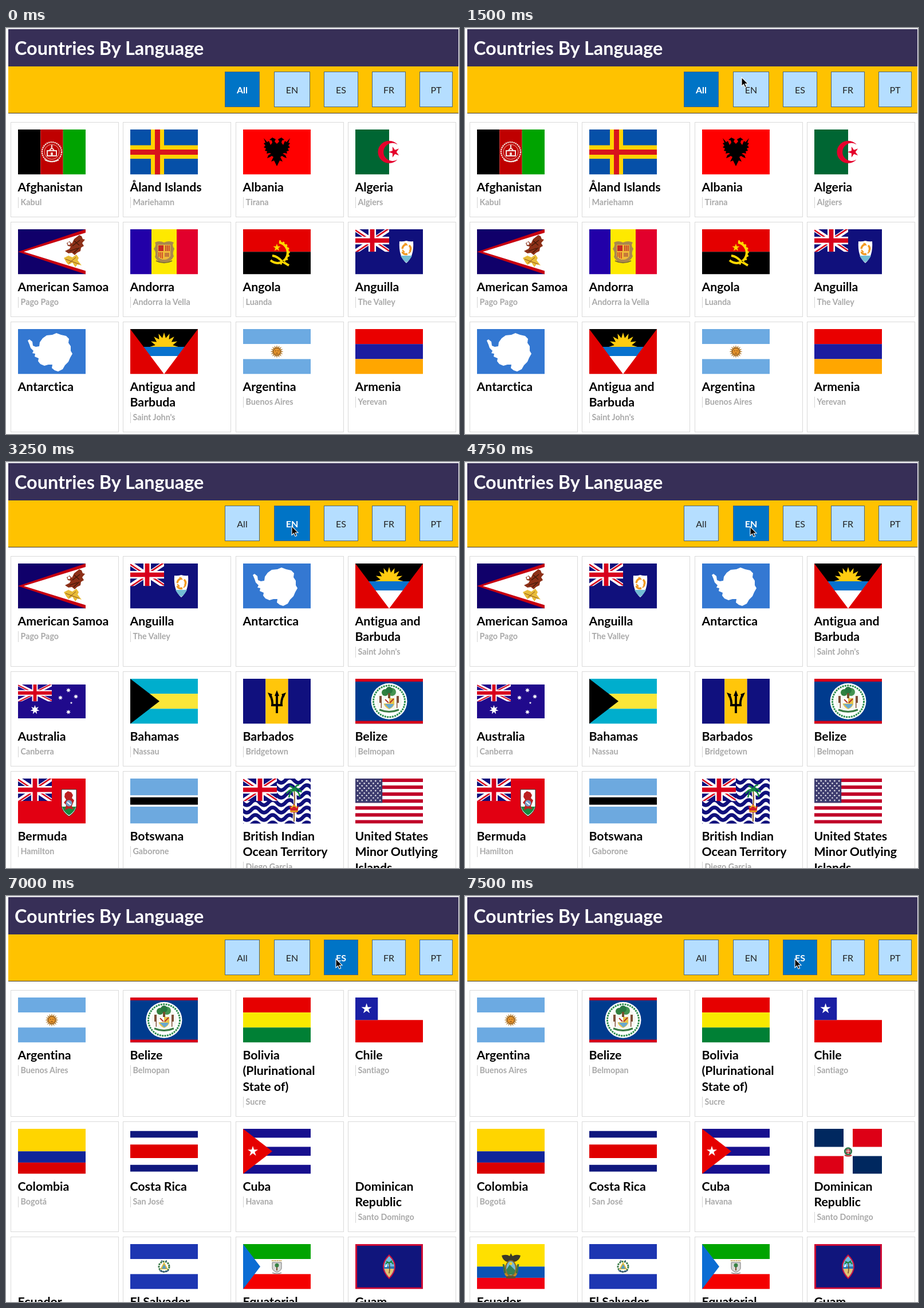
Write an HTML page that moves like this. It is 791 px wide and 708 px high and loops after 8 s.

```html
<!DOCTYPE html>
<html lang="en">
<head>
<meta charset="utf-8">
<title>Countries By Language</title>
<style>
html, body { margin: 0; width: 100%; height: 100%; overflow: hidden; background: #fff; }
svg { display: block; }
#stage { width: 791px; height: 708px; }
text { font-family: Lato, "Open Sans", sans-serif; font-variant-ligatures: none; }
.title { font-size: 32.4px; font-weight: 700; fill: #fff; }
.name { font-size: 21.3px; font-weight: 700; fill: #000; }
.capital { font-size: 14.3px; font-weight: 700; fill: #a9a9a9; }
.button rect { fill: #b5deff; stroke: #4d6577; }
.button text { font-size: 16px; fill: #222; text-anchor: middle; }
.button.on rect { fill: #0074c6; }
.button.on text { fill: #fff; font-weight: 700; }
</style>
</head>
<body>
<svg id="stage" viewBox="0 0 791 708" xmlns="http://www.w3.org/2000/svg"></svg>
<script>
const W = 118, H = 78.5, CX = 59, CY = 39.25;

// Shape helpers
const rect = (x, y, w, h, fill) => `<rect x="${x}" y="${y}" width="${w}" height="${h}" fill="${fill}"/>`;
const circle = (x, y, r, fill, more = '') => `<circle cx="${x}" cy="${y}" r="${r}" fill="${fill}" ${more}/>`;
const path = (d, fill) => `<path d="${d}" fill="${fill}"/>`;
const line = (d, color, width = 1, more = '') =>
  `<path d="${d}" fill="none" stroke="${color}" stroke-width="${width}" ${more}/>`;
const all = fill => rect(0, 0, W, H, fill);
const mirror = d => `<g transform="translate(${CX})">${path(d, '#000')}<path d="${d}" transform="scale(-1 1)"/></g>`;

function star(x, y, r, fill, n = 5, inner = 0.38, turn = -90) {
  const points = Array.from({ length: 2 * n }, (_, i) => {
    const a = (turn + i * 180 / n) * Math.PI / 180, d = i % 2 ? r * inner : r;
    return (x + d * Math.cos(a)).toFixed(2) + ',' + (y + d * Math.sin(a)).toFixed(2);
  });
  return `<polygon points="${points.join(' ')}" fill="${fill}"/>`;
}

// Bands given as [colour, weight] pairs
function bands(spec, vertical = false, height = H, top = 0) {
  const total = spec.reduce((sum, b) => sum + b[1], 0);
  let at = 0;
  return spec.map(([color, weight]) => {
    const size = weight / total * (vertical ? W : height), from = at;
    at += size;
    return vertical ? rect(from, 0, size, height, color) : rect(0, top + from, W, size, color);
  }).join('');
}
const thirds = (a, b, c, vertical) => bands([[a, 1], [b, 1], [c, 1]], vertical);

function unionJack(h = 39.25, blue = '#10107c') {
  const w = 59, x = w / 2, y = h / 2, shift = h / 26;
  const low = y + shift, high = y - shift;
  const redDiagonals = `M0 ${shift}L${x} ${low}L0 ${h + shift}M${w} ${-shift}L${x} ${high}L${w} ${h - shift}`;
  const cross = `M${x} 0V${h}M0 ${y}H${w}`;
  return `<svg width="${w}" height="${h}">` + rect(0, 0, w, h, blue) +
    line(`M0 0L${w} ${h}M${w} 0L0 ${h}`, '#fff', h / 5) + line(redDiagonals, '#d8001c', h / 15) +
    line(cross, '#fff', h / 3) + line(cross, '#d8001c', h / 5) + '</svg>';
}

function waves() {
  let d = '';
  for (let y = 3; y < 95; y += 13) d += `M-16 ${y}q7.5 -9 15 0` + 't15 0'.repeat(9);
  return line(d, '#10107c', 6.5);
}

function starsAndStripes() {
  let s = all('#fff');
  for (let i = 0; i < 13; i += 2) s += rect(0, i * H / 13, W, H / 13, '#c00028');
  s += rect(0, 0, 47.2, 42.3, '#3c3b6e');
  for (let row = 0; row < 9; row++)
    for (let col = row % 2; col < 11; col += 2)
      s += star(3.9 + col * 3.93, 4.2 + row * 4.23, 2.1, '#fff');
  return s;
}

function laurel(r, color, width) {
  return circle(CX, CY, r, 'none', `stroke="${color}" stroke-width="${width}" stroke-dasharray="3 1.4"`);
}

const palm = (x, y) => line(`M${x} ${y}q2 14 0 30`, '#8a6030', 2) +
  line(`M${x - 13} ${y + 6}q6 -9 13 -6q7 -6 13 4M${x - 9} ${y + 13}q2 -11 9 -13q9 2 10 12M${x - 8} ${y - 7}q6 1 8 7q2 -8 9 -9`, '#128a3e', 2.6);

const sun = circle(CX, CY, 6, '#e8962c', 'stroke="#8a541c"');

// Country: name lines, capital, flag, whether the flag loads late
const countries = {
  AF: ['Afghanistan', 'Kabul', thirds('#000', '#bf0000', '#00a300', true) +
    circle(59, 39, 17, 'none', 'stroke="#f0d8d0" stroke-width="2.4" stroke-dasharray="2.5 1"') +
    circle(59, 39, 13, 'none', 'stroke="#e8b4a8"') +
    line('M51 46V37H67V46ZM55 37q4 -8 8 0M59 27v5M47 53q12 6 24 0', '#f4e4e0', 2) + rect(57, 40, 4, 6, '#f0d0c8')],
  AX: ['Åland Islands', 'Mariehamn', all('#0650a8') + rect(36, 0, 23, H, '#ffd300') + rect(0, 27.5, W, 23.5, '#ffd300') +
    rect(43, 0, 9, H, '#d8141c') + rect(0, 35, W, 9, '#d8141c')],
  AL: ['Albania', 'Tirana', all('#ff0000') +
    mirror('M0 25L4 21 2 17 8 14 13 18 9 19 8 23 11 27 14 20 17 22 23 15 20 23 23 24 20 28 23 31 19 33 21 37 17 38 18 42 13 41 10 42 15 45 17 50 12 48 9 46 6 48 10 56 5 54 3 58 0 64Z')],
  DZ: ['Algeria', 'Algiers', all('#fff') + rect(0, 0, CX, H, '#006633') +
    path('M73.6 26.2A19.6 19.6 0 1 0 73.6 52.3A15.7 15.7 0 1 1 73.6 26.2Z', '#e4002b') +
    star(68, CY, 10, '#e4002b', 5, 0.38, 180)],
  AS: ['American Samoa', 'Pago Pago', all('#10006a') + path('M0 39.25L118 0V78.5Z', '#c80010') +
    path('M10 39.25L118 6V72.5Z', '#fff') +
    path('M85 24L90 21 94 25 98 17 107 10 111 12 113 17 117 18 112 24 115 29 110 32 109 38 103 41 99 45 94 41 88 42 82 38 90 34 92 30 87 29Z', '#8c3018') +
    line('M98 20l9 8M95 29l13 -10M90 38l14 -5M97 41l10 -9', '#401808', 1.3) + circle(89, 25, 2.4, '#fff') +
    path('M80 50L88 46 95 49 102 44 106 50 104 54 111 63 104 61 100 66 95 58 88 62 84 57Z', '#e8bc38') +
    line('M83 52l24 9M89 59l12 -10', '#8c5020')],
  AD: ['Andorra', 'Andorra la Vella', bands([['#2200a8', 37], ['#fee900', 44], ['#e2002c', 37]], true) +
    path('M43 23Q50 19 59 23Q68 19 76 23Q72 28 77 34Q73 41 76 47Q71 58 59 58Q47 58 43 48Q46 41 41 34Q46 28 43 23Z', '#ab884e') +
    path('M48 27H70V47Q66 53 59 53Q52 53 48 47Z', '#f0bb38') + rect(49, 28, 9, 10, '#c72a24') + rect(60, 28, 9, 10, '#dfa83a') +
    line('M62 28V38M65 28V38M68 28V38M50 40V48M53 40V50M56 40V51', '#c72a24', 1.4) + rect(60, 41, 8, 7, '#c67a3a') +
    line('M45 55Q59 62 73 55', '#716039', 1.5)],
  AO: ['Angola', 'Luanda', bands([['#e40000', 1], ['#000', 1]]) +
    line('M63 23A18 18 0 0 1 65 58', '#ffd800', 4.2) +
    line('M63 21A20 20 0 0 1 65 60', '#ffd800', 4, 'stroke-dasharray="3 3.4"') +
    star(59, 32, 7, '#ffd800') + line('M51 46Q60 47 68 56L80 63', '#ffd800', 4) +
    line('M48 54q8 7 18 4', '#ffd800', 4) + line('M69 55l3 2', '#000', 1)],
  AI: ['Anguilla', 'The Valley', all('#10107c') + unionJack() +
    path('M77 21Q83 22 89 20Q95 22 101 21Q103 47 89 59Q75 47 77 21Z', '#fff') +
    path('M79 46H99Q96 53 89 58Q82 53 79 46Z', '#72bcd4') +
    line('M82 34q1 -7 8 -8M94 28q5 5 1 11M91 43q-7 2 -9 -4', '#f29a22', 3.4) + line('M86 24l5 4M97 38l-4 4M82 36l4 4', '#f29a22', 2)],
  AQ: ['Antarctica', '', all('#3478d2') +
    path('M17 20L20 18 25 22 26 29 31 31 37 30 38 23 43 16 50 11 60 10 67 7 75 10 84 12 89 17 88 24 92 30 92 38 95 43 91 50 88 57 82 63 78 70 70 74 64 72 59 68 60 62 53 62 46 64 39 61 35 56 36 51 29 48 30 43 25 42 27 38 22 33 20 27Z', '#fff')],
  AG: ['Antigua and|Barbuda', "Saint John's", all('#e00000') + path('M0 0H118L94.7 31H23.3Z', '#000') +
    `<svg width="118" height="31">${star(CX, 31, 25, '#ffcc10', 16, 0.62)}</svg>` +
    path('M23.3 31H94.7L82.7 47H35.3Z', '#0872ce') + path('M35.3 47H82.7L59 78.5Z', '#fff')],
  AR: ['Argentina', 'Buenos Aires', thirds('#6caae2', '#fff', '#6caae2') + star(CX, CY, 11.5, '#b9853d', 16, 0.62) + sun +
    line('M56 38h2M60 38h2M57 42h4', '#6c3c14')],
  AM: ['Armenia', 'Yerevan', thirds('#ea0000', '#1c1ca0', '#ffa600')],
  AU: ['Australia', 'Canberra', `<svg y="10" width="118" height="59">` + all('#200a8c') + unionJack(29.5, '#200a8c') +
    star(29.5, 44, 8.2, '#fff', 7, 0.45) + [[88, 10], [74, 23], [101, 21], [88, 48]].map(p => star(...p, 4.3, '#fff', 7, 0.45)).join('') +
    star(93, 32, 2.5, '#fff') + '</svg>'],
  BS: ['Bahamas', 'Nassau', thirds('#00aecd', '#fae638', '#00aecd') + path('M0 0L51 39.25 0 78.5Z', '#000')],
  BB: ['Barbados', 'Bridgetown', thirds('#10107e', '#ffc60a', '#10107e', true) +
    line('M59 25V60M47 27Q52 38 51 46H67Q66 38 71 27', '#000', 3.8) +
    path('M59 20L63 30H55ZM43 24L51 27 47 33ZM75 24L67 27 71 33Z', '#000')],
  BZ: ['Belize', 'Belmopan', all('#003b8e') + rect(0, 0, W, 5, '#d80018') + rect(0, 73.5, W, 5, '#d80018') +
    circle(CX, CY, 31.5, '#fff') + laurel(27.5, '#2f8f4d', 3) + circle(CX, CY, 22, '#f5f8f2') +
    circle(52, 24, 6, '#30803f') + circle(64, 23, 7, '#439451') + circle(59, 20, 6, '#27783f') + rect(57, 25, 4, 10, '#75502d') +
    path('M50 34H68V45Q65 51 59 53Q53 51 50 45Z', '#e8c44a') + path('M50 34H59V43H50Z', '#fff') + path('M51 44H67Q65 50 59 52Z', '#68a8d0') +
    line('M52 36l6 6M60 42l7 -7', '#b53527', 2) + line('M44 30V51M74 30V51', '#805038', 4) +
    line('M43 42V52M75 42V52', '#fff', 3) + line('M42 54q17 7 34 0', '#387b43', 3)],
  BM: ['Bermuda', 'Hamilton', all('#e20012') + unionJack() +
    path('M76 19H102V48Q101 58 89 66Q77 58 76 48Z', '#fff') + path('M77 49H101Q99 58 89 64Q79 58 77 49Z', '#168a3e') +
    line('M76 19H102V48Q101 58 89 66Q77 58 76 48Z', '#303030', 1) +
    path('M82 26L87 22 93 24 96 29 94 34 98 38 94 48 97 54 89 52 82 55 84 46 80 42 84 37 81 32Z', '#bc2020') +
    circle(89, 43, 5.5, '#719dc8') + line('M86 41l6 5', '#fff', 2)],
  BW: ['Botswana', 'Gaborone', bands([['#6da9df', 9], ['#fff', 1], ['#000', 4], ['#fff', 1], ['#6da9df', 9]])],
  IO: ['British Indian|Ocean Territory', 'Diego Garcia', all('#fff') + waves() + unionJack() +
    line('M89 18q4 25 0 57', '#fff', 6) + palm(89, 20) + line('M89 45V75', '#8a6030', 2) +
    path('M81 47L85 50 89 44 93 50 97 47 95 59H83Z', '#d02028') + line('M82 57H96M84 51q5 -7 10 0', '#e8bc20', 2)],
  UM: ['United States|Minor Outlying|Islands', '', starsAndStripes()],
  BO: ['Bolivia|(Plurinational|State of)', 'Sucre', thirds('#e60000', '#f8e900', '#008035')],
  CL: ['Chile', 'Santiago', bands([['#fff', 1], ['#e60000', 1]]) + rect(0, 0, 39.3, 39.25, '#1a1fa4') + star(19.6, 19.6, 9.6, '#fff')],
  CO: ['Colombia', 'Bogotá', bands([['#ffd500', 2], ['#10259a', 1], ['#da0000', 1]])],
  CR: ['Costa Rica', 'San José', bands([['#10187e', 1], ['#fff', 1], ['#e00000', 2], ['#fff', 1], ['#10187e', 1]], false, 70.8, 3.8)],
  CU: ['Cuba', 'Havana', bands(['#17108e', '#fff', '#17108e', '#fff', '#17108e'].map(c => [c, 1])) +
    path('M0 0L51 39.25 0 78.5Z', '#e60000') + star(17, CY, 9.5, '#fff')],
  DO: ['Dominican|Republic', 'Santo Domingo', all('#fff') + rect(0, 0, 51, 31.5, '#00285f') + rect(67, 0, 51, 31.5, '#dd0016') +
    rect(0, 47.5, 51, 31, '#dd0016') + rect(67, 47.5, 51, 31, '#00285f') +
    circle(CX, CY, 6, '#71806b', 'stroke="#237041" stroke-width="2"') + rect(56, 36, 6, 7, '#c02a32') + line('M59 35v9M55 39h8', '#fff') +
    line('M53 46q6 3 12 0', '#c02a32', 2), true],
  EC: ['Ecuador', 'Quito', bands([['#ffe000', 2], ['#0c53b4', 1], ['#f00012', 1]]) +
    path('M43 20Q52 17 57 21L59 16 62 21Q68 17 76 20Q74 29 65 31H53Q45 29 43 20Z', '#3b3928') +
    line('M49 37q-2 13 5 19M69 37q2 13 -5 19', '#c48a20', 5) + line('M46 35l3 16M72 35l-3 16', '#347044', 3) +
    `<ellipse cx="59" cy="42" rx="9" ry="13" fill="#77bad6" stroke="#8d6824" stroke-width="2"/>` +
    path('M51 45L57 36 67 46 64 53H54Z', '#378052') + circle(59, 34, 2.5, '#ffd228') + line('M51 58h16', '#5e5030', 4), true],
  SV: ['El Salvador', 'San Salvador', thirds('#1d36b2', '#fff', '#1d36b2') + laurel(9, '#397845', 3) +
    path('M59 31L66 44H52Z', '#e1bd42') + path('M59 35L63 43H55Z', '#579dc0') + line('M51 46q8 5 16 0M55 31v-3M63 31v-3', '#305080', 1.5)],
  GQ: ['Equatorial|Guinea', 'Malabo', thirds('#00a400', '#fff', '#f40000') + path('M0 0L30 39.25 0 78.5Z', '#0b6dd4') +
    path('M51 32H67V42Q66 47 59 49Q52 47 51 42Z', '#d7d9d7') + line('M51 32H67V42Q66 47 59 49Q52 47 51 42Z', '#777') +
    line('M59 36V46', '#75502d', 2) + circle(59, 37, 3.5, '#388244') + line('M50 29h18', '#bea044', 2, 'stroke-dasharray="2 1"') +
    line('M51 50q8 3 16 0', '#999', 1.5)],
  GU: ['Guam', 'Hagåtña', all('#cf0b34') + rect(3, 3, W - 6, H - 6, '#10157c') +
    path('M59 18Q81 39 59 61Q37 39 59 18Z', '#d61238') + path('M59 21Q77 39 59 58Q41 39 59 21Z', '#70bce4') +
    path('M51 43Q59 39 67 43Q65 51 59 58Q53 51 51 43Z', '#e6c36e') + path('M50 39H68V43H50Z', '#2879b8') +
    line('M59 33q2 8 0 18', '#76502a', 1.6) + line('M53 35q3 -5 6 -2q4 -4 7 2M54 30l5 3 5 -4', '#17823a', 2) + path('M53 38l2 -4v6h-4z', '#fff')]
};

const pages = {
  All: 'AF AX AL DZ AS AD AO AI AQ AG AR AM',
  EN: 'AS AI AQ AG AU BS BB BZ BM BW IO UM',
  ES: 'AR BZ BO CL CO CR CU DO EC SV GQ GU'
};
const LINE = 27.4;

function card(code, x, y, height) {
  const [name, capital, flag, late] = countries[code];
  const lines = name.split('|'), left = x + 13, top = Math.round(y) + 13;
  const capitalY = top + 132 + (lines.length - 1) * LINE;
  return `<rect x="${x + 0.5}" y="${Math.round(y) + 0.5}" width="188" height="${Math.round(height)}" fill="#fff" stroke="#dadada"/>` +
    `<svg class="${late ? 'late' : ''}" x="${left}" y="${top}" width="${W}" height="${H}">${flag}</svg>` +
    lines.map((s, i) => `<text class="name" x="${left - 0.5}" y="${top + 108 + i * LINE}">${s}</text>`).join('') +
    (capital && rect(left, Math.round(capitalY - 14), 1, 19, '#d4d4d4') +
      `<text class="capital" x="${left + 4.5}" y="${capitalY}">${capital}</text>`);
}

function page(name) {
  const codes = pages[name].split(' ');
  let y = 164, out = '';
  for (let i = 0; i < codes.length; i += 4) {
    const row = codes.slice(i, i + 4);
    const count = Math.max(...row.map(c => countries[c][0].split('|').length));
    const height = 165 + (count - 1) * LINE;
    out += row.map((c, col) => card(c, Math.floor(8.2 + 196.4 * col), y, height)).join('');
    y += height + 9;
  }
  return `<g class="page" data-lang="${name}">${out}</g>`;
}

const button = ([name, x, w]) => `<g class="button" data-lang="${name}">` +
  `<rect x="${x + 0.5}" y="76.5" width="${w - 1}" height="61"/><text x="${x + w / 2}" y="113.5">${name}</text></g>`;

const stage = document.getElementById('stage');
stage.innerHTML = rect(0, 0, 791, 708, '#fff') + rect(0, 0, 791, 1, '#dcdce2') +
  rect(4, 2, 786, 65, '#372f57') + rect(4, 67, 786, 81, '#ffc200') + rect(4, 148, 786, 1, '#40391f') +
  '<text class="title" x="15" y="47">Countries By Language</text>' +
  [['All', 382, 61], ['EN', 468, 63], ['ES', 555, 60], ['FR', 639, 59], ['PT', 722, 58]].map(button).join('') +
  Object.keys(pages).map(page).join('') +
  '<path id="cursor" d="M0 0V15.5L3.6 12.2 6 17.6 8.6 16.5 6.2 11.2H11Z" fill="#000" stroke="#fff" stroke-width="1.1"/>';

const cursor = document.getElementById('cursor');
const buttons = stage.querySelectorAll('.button');
const groups = stage.querySelectorAll('.page');
const lateFlags = stage.querySelectorAll('.late');

// Pointer stops: start time, x, y
const stops = [[500, 680, 124], [1000, 693, 106], [1250, 450, 69], [1500, 483, 86], [1750, 488, 93], [2000, 499, 112],
  [4750, 498, 113], [5000, 535, 113], [5250, 572, 109], [5500, 576, 109.5]];
const show = (el, on) => el.setAttribute('visibility', on ? 'visible' : 'hidden');

function draw(t) {
  const lang = t < 3250 ? 'All' : t < 7000 ? 'EN' : 'ES';
  buttons.forEach(b => b.classList.toggle('on', b.dataset.lang === lang));
  groups.forEach(g => g.style.display = g.dataset.lang === lang ? '' : 'none');
  lateFlags.forEach(f => show(f, t >= 7250));
  const stop = stops.filter(s => s[0] <= t).pop();
  show(cursor, stop);
  if (stop) cursor.setAttribute('transform', `translate(${stop[1]} ${stop[2]})`);
}

const start = performance.now();
function tick() {
  draw((performance.now() - start) % 8000);
  requestAnimationFrame(tick);
}
tick();
</script>
</body>
</html>
```
